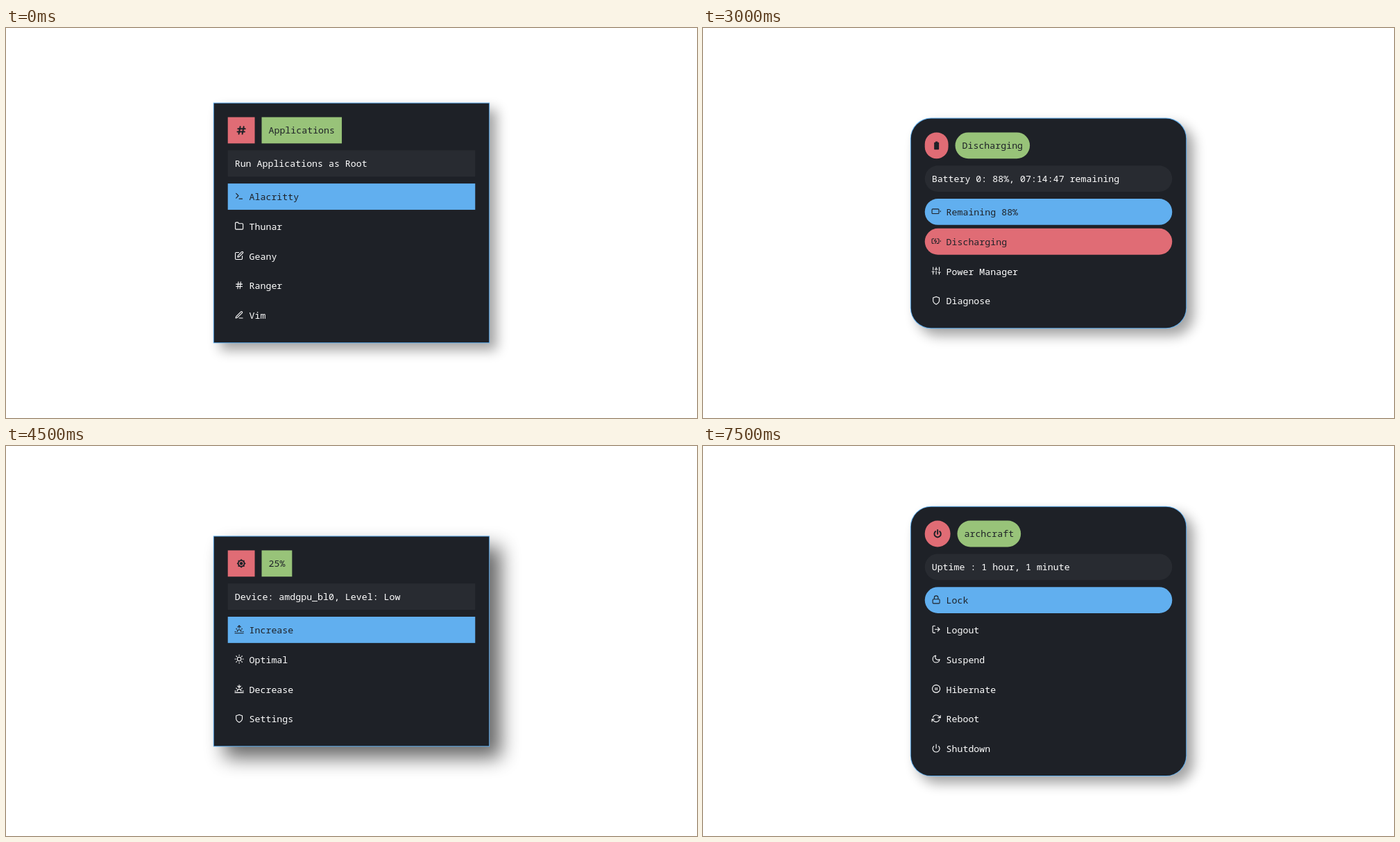
Write an HTML page that moves like this. It is 996x562 px and loops after 8 s.

```html
<!DOCTYPE html>
<html lang="en">
<head>
<meta charset="utf-8">
<title>Menus</title>
<style>
  html, body { margin: 0; width: 100%; height: 100%; overflow: hidden; background: #fff; }
  svg { display: block; }
  text { font: 13.333px "Noto Sans Mono", "DejaVu Sans Mono", monospace; white-space: pre; }
  .note { font-size: 11.667px; font-style: italic; }
  .line { fill: none; stroke-width: 2; stroke-linecap: round; stroke-linejoin: round; }
</style>
</head>
<body>
<svg id="stage" width="996" height="562" viewBox="0 0 1000 564.257"></svg>
<script>
const DARK = '#1e2127', ALT = '#282b31', WHITE = '#fff';
const BLUE = '#61afef', GREEN = '#98c379', RED = '#e06c75';
const LEFT = 321, WIDTH = 358, ROW = 38, PITCH = 43;

const circle = (x, y, r) => `M${x - r} ${y}a${r} ${r} 0 1 0 ${2 * r} 0a${r} ${r} 0 1 0 ${-2 * r} 0z`;
const box = (x, y, w, h) =>
  `M${x + 2} ${y}h${w - 4}a2 2 0 0 1 2 2v${h - 4}a2 2 0 0 1-2 2h${4 - w}a2 2 0 0 1-2-2v${4 - h}a2 2 0 0 1 2-2z`;

function gear() {
  const points = Array.from({ length: 96 }, (_, i) => {
    const a = i / 96 * 2 * Math.PI, r = 9.6 + 1.4 * Math.cos(8 * a);
    return `${(12 + r * Math.cos(a)).toFixed(2)} ${(12 + r * Math.sin(a)).toFixed(2)}`;
  });
  return `M${points.join('L')}z`;
}

const horizon = 'M17 18a5 5 0 0 0-10 0M4.22 10.22l1.42 1.42M1 18h2M21 18h2M18.36 11.64l1.42-1.42M23 22H1M12 2v7';

// Line icons on a 24 unit grid
const ICONS = {
  terminal: 'M4 17l6-6-6-6M12 19h8',
  folder: 'M22 19a2 2 0 0 1-2 2H4a2 2 0 0 1-2-2V5a2 2 0 0 1 2-2h5l2 3h9a2 2 0 0 1 2 2z',
  edit: 'M11 4H4a2 2 0 0 0-2 2v14a2 2 0 0 0 2 2h14a2 2 0 0 0 2-2v-7M18.5 2.5a2.12 2.12 0 0 1 3 3L12 15l-4 1 1-4z',
  hash: 'M4 9h16M4 15h16M10 3L8 21M16 3l-2 18',
  pen: 'M12 20h9M16.5 3.5a2.12 2.12 0 0 1 3 3L7 19l-4 1 1-4z',
  globe: circle(12, 12, 10) + 'M2 12h20M12 2a15.3 15.3 0 0 1 4 10 15.3 15.3 0 0 1-4 10 15.3 15.3 0 0 1-4-10 15.3 15.3 0 0 1 4-10z',
  music: 'M9 18V5l12-2v13' + circle(6, 18, 3) + circle(18, 16, 3),
  settings: gear() + circle(12, 12, 3),
  battery: box(1, 6, 18, 12) + 'M23 13v-2',
  charging: 'M5 18H3a2 2 0 0 1-2-2V8a2 2 0 0 1 2-2h3.19M15 6h2a2 2 0 0 1 2 2v8a2 2 0 0 1-2 2h-3.19M23 13v-2M11 6l-4 6h6l-4 6',
  sliders: 'M4 21v-7M4 10V3M12 21v-9M12 8V3M20 21v-5M20 12V3M1 14h6M9 8h6M17 16h6',
  shield: 'M12 22s8-4 8-10V5l-8-3-8 3v7c0 6 8 10 8 10z',
  sunrise: horizon + 'M8 6l4-4 4 4',
  sunset: horizon + 'M16 5l-4 4-4-4',
  sun: circle(12, 12, 5) + 'M12 1v2M12 21v2M4.22 4.22l1.42 1.42M18.36 18.36l1.42 1.42M1 12h2M21 12h2M4.22 19.78l1.42-1.42M18.36 5.64l1.42-1.42',
  play: 'M5 3l14 9-14 9z',
  stop: box(3, 3, 18, 18),
  previous: 'M19 20L9 12l10-8zM5 19V5',
  next: 'M5 4l10 8-10 8zM19 5v14',
  repeat: 'M17 1l4 4-4 4M3 11V9a4 4 0 0 1 4-4h14M7 23l-4-4 4-4M21 13v2a4 4 0 0 1-4 4H3',
  shuffle: 'M16 3h5v5M4 20L21 3M21 16v5h-5M15 15l6 6M4 4l5 5',
  lock: box(3, 11, 18, 11) + 'M7 11V7a5 5 0 0 1 10 0v4',
  logout: 'M9 21H5a2 2 0 0 1-2-2V5a2 2 0 0 1 2-2h4M16 17l5-5-5-5M21 12H9',
  moon: 'M21 12.79A9 9 0 1 1 11.21 3 7 7 0 0 0 21 12.79z',
  pause: circle(12, 12, 10) + 'M10 15V9M14 15V9',
  refresh: 'M23 4v6h-6M1 20v-6h6M3.51 9a9 9 0 0 1 14.85-3.36L23 10M1 14l4.64 4.36A9 9 0 0 0 20.49 15',
  power: 'M18.36 6.64a9 9 0 1 1-12.73 0M12 2v10',
};

// Solid header icons, centred on 0,0
const tile = (x, y) => `<rect x="${x}" y="${y}" width="5.8" height="4.8" rx=".8"/>`;
const BADGES = {
  hash: `<path class="line" stroke="${DARK}" d="M-1.5-5.3L-3.6 5.3M3.6-5.3L1.5 5.3M-4.8-2.1H5.6M-5.6 2.1H4.8"/>`,
  grid: tile(-6.2, -5) + tile(.4, -5) + tile(-6.2, .5) + tile(.4, .5),
  battery: '<rect x="-3.5" y="-4.6" width="7" height="10.6" rx=".8"/><rect x="-1.6" y="-5.8" width="3.2" height="2"/>',
  bright: `<rect x="-4.6" y="-4.6" width="9.2" height="9.2"/><rect x="-4.6" y="-4.6" width="9.2" height="9.2" transform="rotate(45)"/>
    <circle r="2.9" fill="none" stroke="${RED}" stroke-width="1.2"/>`,
  music: '<ellipse cx="-3.8" cy="4.3" rx="2.4" ry="1.9"/><ellipse cx="3.8" cy="2.6" rx="2.4" ry="1.9"/><path d="M-2.9 4.3V-3.6L6.2-6V2.6H4.5V-1.9L-1.4-.4V4.3z"/>',
  power: `<path class="line" stroke="${DARK}" d="M-3-3.4a4.7 4.7 0 1 0 6 0M0-5.4V.2"/>`,
};

const soft = { d: 10, blur: 9, alpha: .36 }, deep = { d: 16, blur: 14, alpha: .6 };
const square = { panel: 0, row: 0 }, rounded = { panel: 12, row: 12 }, pill = { panel: 30, row: 19 };

// Rows: icon, label, note, background
const SCREENS = [
  { start: 0, top: 108, shape: square, shadow: soft, badge: 'hash', badgeWidth: 39,
    title: 'Applications', message: 'Run Applications as Root',
    rows: [['terminal', 'Alacritty'], ['folder', 'Thunar'], ['edit', 'Geany'], ['hash', 'Ranger'], ['pen', 'Vim']] },
  { start: 1500, top: 87, shape: rounded, shadow: soft, badge: 'grid', badgeWidth: 38,
    title: 'Applications', message: 'Installed Packages : 1408 (pacman)',
    rows: [['terminal', 'Terminal', '(alacritty)'], ['folder', 'Files', '(thunar)'], ['edit', 'Editor', '(geany)'],
      ['globe', 'Browser', '(firefox)'], ['music', 'Music', '(alacritty -e ncmpcpp)'],
      ['settings', 'Settings', '(xfce4-settings-manager)']] },
  { start: 3000, top: 130, shape: pill, shadow: soft, badge: 'battery', badgeWidth: 34,
    title: 'Discharging', message: 'Battery 0: 88%, 07:14:47 remaining',
    rows: [['battery', 'Remaining 88%'], ['charging', 'Discharging', '', RED], ['sliders', 'Power Manager'],
      ['shield', 'Diagnose']] },
  { start: 4500, top: 130, shape: square, shadow: deep, badge: 'bright', badgeWidth: 39,
    title: '25%', message: 'Device: amdgpu_bl0, Level: Low',
    rows: [['sunrise', 'Increase'], ['sun', 'Optimal'], ['sunset', 'Decrease'], ['shield', 'Settings']] },
  { start: 6000, top: 87, shape: rounded, shadow: soft, badge: 'music', badgeWidth: 37,
    title: 'Terrowin Haskelbright',
    message: 'A Lamp Beside Rain <tspan dx="1.8">:</tspan><tspan dx="-3.6">:</tspan><tspan dx="1.8"> 1:03/3:23</tspan>',
    rows: [['play', 'Play'], ['stop', 'Stop'], ['previous', 'Previous'], ['next', 'Next'],
      ['repeat', 'Repeat', '', GREEN], ['shuffle', 'Random', '', RED]] },
  { start: 7500, top: 87, shape: pill, shadow: soft, badge: 'power', badgeWidth: 37,
    title: 'archcraft', message: 'Uptime : 1 hour, 1 minute',
    rows: [['lock', 'Lock'], ['logout', 'Logout'], ['moon', 'Suspend'], ['pause', 'Hibernate'],
      ['refresh', 'Reboot'], ['power', 'Shutdown']] },
];
const LOOP = 8000;

const rect = (x, y, w, h, r, fill, extra = '') =>
  `<rect x="${x}" y="${y}" width="${w}" height="${h}" rx="${Math.min(r, w / 2)}" fill="${fill}" ${extra}/>`;
const label = (x, top, fill, content) => `<text x="${x}" y="${top + 24}" fill="${fill}">${content}</text>`;

function drawRow([icon, name, note, fill], index, top, radius) {
  const back = index === 0 ? BLUE : fill, ink = back ? DARK : WHITE;
  const noteSpan = note ? ` <tspan class="note">${note}</tspan>` : '';
  return (back ? rect(LEFT, top, WIDTH, ROW, radius, back) : '') +
    `<path class="line" stroke="${ink}" d="${ICONS[icon]}" transform="translate(330.8 ${top + 11.6}) scale(.555)"/>` +
    label(352, top, ink, name + noteSpan);
}

function drawScreen({ top, shape, shadow, badge, badgeWidth, title, message, rows }) {
  const head = top + 21, info = head + 48, list = info + 48;
  const height = 138 + (rows.length - 1) * PITCH + ROW - 0;
  const { d, blur, alpha } = shadow;
  const titleX = LEFT + badgeWidth + 10;
  return `<g visibility="hidden">` +
    rect(300 + d, top + d, 400, height, shape.panel, '#000', `opacity="${alpha}" style="filter:blur(${blur}px)"`) +
    rect(300, top, 400, height, shape.panel, BLUE) +
    rect(301, top + 1, 398, height - 2, Math.max(0, shape.panel - 1), DARK) +
    rect(LEFT, head, badgeWidth, ROW, shape.row, RED) +
    `<g fill="${DARK}" transform="translate(${LEFT + badgeWidth / 2} ${head + 19})">${BADGES[badge]}</g>` +
    rect(titleX, head, title.length * 8 + 20, ROW, shape.row, GREEN) +
    label(titleX + 10, head, DARK, title) +
    rect(LEFT, info, WIDTH, ROW, shape.row, ALT) +
    label(LEFT + 10, info, WHITE, message) +
    rows.map((row, i) => drawRow(row, i, list + i * PITCH, shape.row)).join('') + '</g>';
}

const stage = document.getElementById('stage');
stage.innerHTML = SCREENS.map(drawScreen).join('');
const groups = [...stage.children];

function show() {
  const time = performance.now() % LOOP;
  const current = SCREENS.findLastIndex(screen => time >= screen.start);
  groups.forEach((group, i) => group.setAttribute('visibility', i === current ? 'visible' : 'hidden'));
  requestAnimationFrame(show);
}
show();
</script>
</body>
</html>
```
